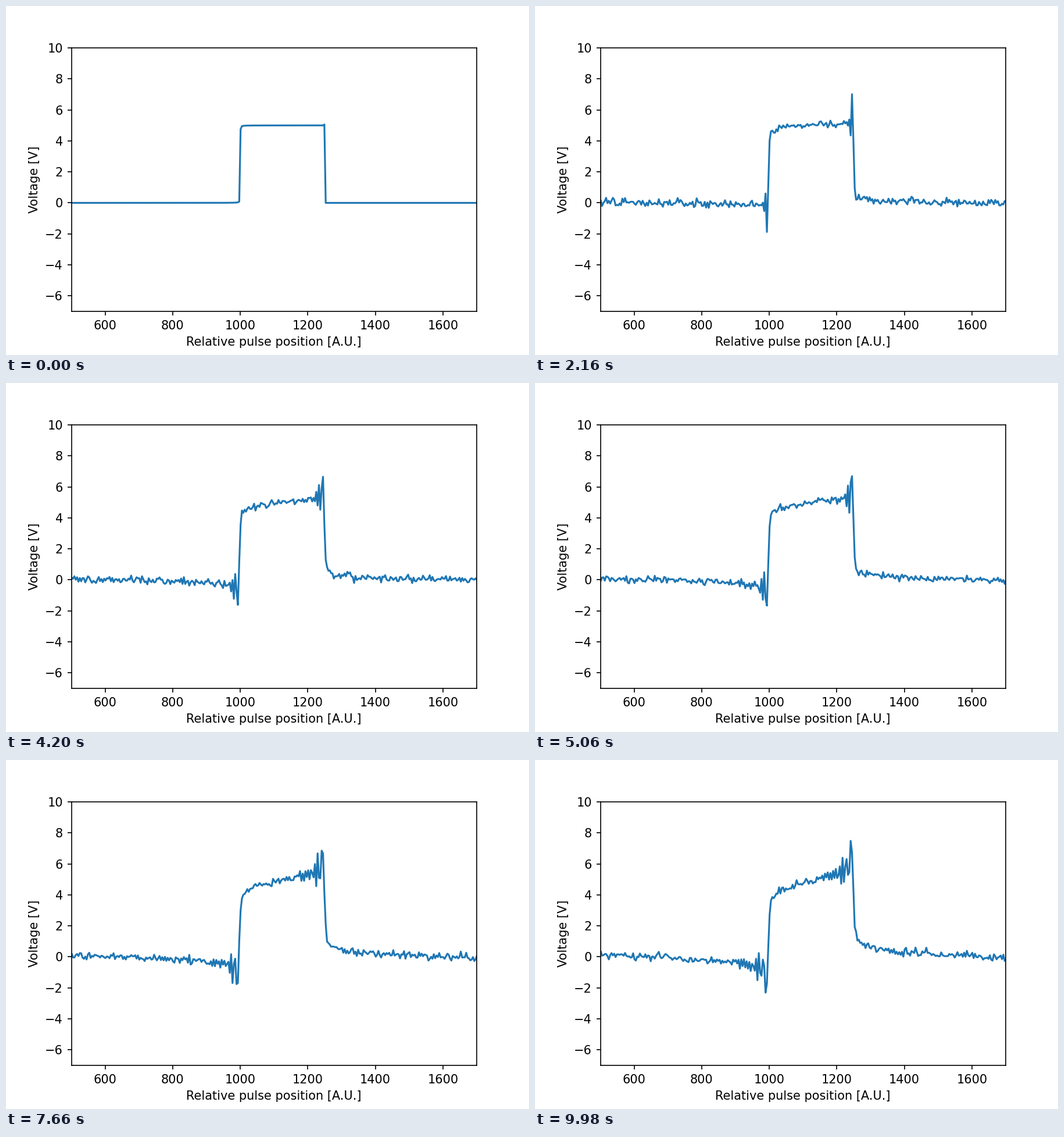
A matplotlib script for the animation above (10000 ms loop, 900 px wide and 600 px high).

```python
import numpy as np
import matplotlib.pyplot as plt
from matplotlib.animation import FuncAnimation

FRAMES = 500
INTERVAL = 20
STEP = 4          # position units between samples
PERIOD = 1000     # pulse repetition length
HIGH = 5.0        # pulse height in volts
NOISE = 0.12      # standard deviation in volts

x = np.arange(481, 1722, STEP)


def clean_pulse():
    """One period of the pulse: arctan rise at 0, sharp fall at 250."""
    pos = np.arange(1, PERIOD, STEP)
    u = (pos + 750) % PERIOD - 750
    y = HIGH * (0.5 + np.arctan(u / 0.158) / np.pi)
    y[u == 249] += 0.06
    return y


spectrum = np.fft.rfft(clean_pulse())
k = np.linspace(0, np.pi, len(spectrum))
# Low frequencies lag a little, high ones run ahead of the edge.
phase = 0.26 * k**3.5 - 0.24 * np.exp(-k / 0.8)
phase[0] = 0


def voltage(n):
    shift = np.exp(1j * phase * n / (FRAMES - 1))
    period = np.fft.irfft(spectrum * shift, PERIOD // STEP)
    y = period[(x // STEP) % len(period)]
    if n > 0:
        y = y + np.random.default_rng(n).normal(0, NOISE, len(x))
    return y


fig, ax = plt.subplots(figsize=(6, 4), dpi=150)
fig.subplots_adjust(left=0.125, right=0.9, bottom=0.125, top=0.88)
line, = ax.plot(x, voltage(0), color="#1f77b4", lw=1.5)
ax.set_xlim(500, 1700)
ax.set_ylim(-7, 10)
ax.set_xlabel("Relative pulse position [A.U.]")
ax.set_ylabel("Voltage [V]")


def update(n):
    line.set_ydata(voltage(n))
    return line,


anim = FuncAnimation(fig, update, frames=FRAMES, interval=INTERVAL,
                     repeat=True, repeat_delay=0)
plt.show()
```
